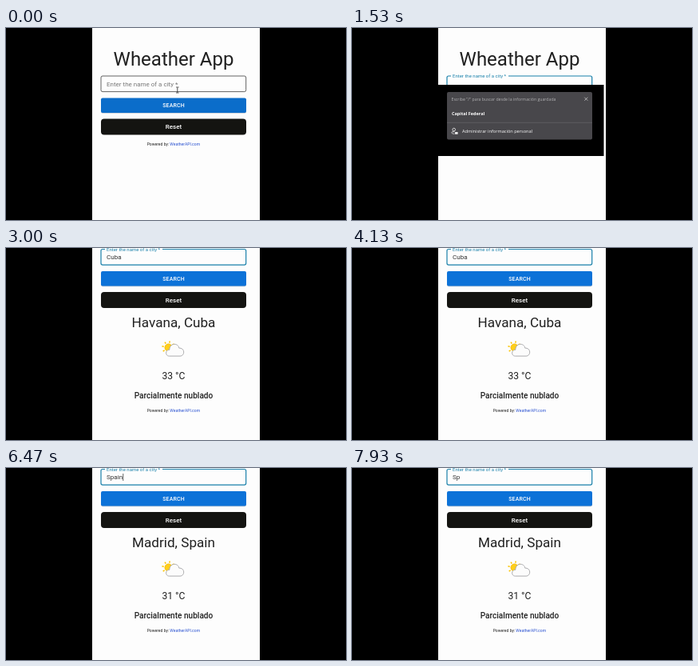
An HTML page with a canvas that plays this animation: 426x240 px, repeating every 8 s.

```html
<!DOCTYPE html>
<html lang="en">
<head>
<meta charset="utf-8">
<title>Weather search</title>
<style>
html, body { margin: 0; width: 100%; height: 100%; overflow: hidden; background: #000; }
canvas { display: block; width: 426px; height: 240px; }
</style>
</head>
<body>
<canvas id="stage"></canvas>
<script>
const W = 426, H = 240, LOOP = 8000, MID = 210;
const canvas = document.getElementById('stage');
const ctx = canvas.getContext('2d');
const ratio = window.devicePixelRatio || 1;
canvas.width = W * ratio;
canvas.height = H * ratio;

const ROBOTO = 'Roboto, sans-serif';
const OPEN = '"Open Sans", sans-serif';
const INK = '#202020', FOCUS = '#1980aa', PAGE = '#fdfdfd';

const FOCUS_AT = 1050, POPUP_AT = 1250, POPUP_END = 1870;
const RESULT_AT = 2500, SCROLL_AT = 2600, SECOND_AT = 6200;
const BLINK = 1060;

// Each entry: start, ms per key, word, deleting or not
const typing = [
  [1870, 110, 'Cuba', false],
  [4350, 90, 'Cuba', true],
  [5350, 130, 'Spain', false],
  [7700, 90, 'Spain', true]
];

const clamp = v => Math.max(0, Math.min(1, v));
const ease = v => { v = clamp(v); return v * v * (3 - 2 * v); };
const mix = (a, b, p) => a + (b - a) * p;

function text(str, x, y, size, color = INK, weight = 400, align = 'left', family = ROBOTO) {
  ctx.font = `${weight} ${size}px ${family}`;
  ctx.textAlign = align;
  ctx.fillStyle = color;
  ctx.fillText(str, x, y);
  return ctx.measureText(str).width;
}

function box(x, y, w, h, r, fill) {
  ctx.beginPath();
  ctx.roundRect(x, y, w, h, r);
  ctx.fillStyle = fill;
  ctx.fill();
}

function line(x1, y1, x2, y2, color, width = 1) {
  ctx.beginPath();
  ctx.moveTo(x1, y1);
  ctx.lineTo(x2, y2);
  ctx.strokeStyle = color;
  ctx.lineWidth = width;
  ctx.stroke();
}

function valueAt(t) {
  let value = '';
  for (const [start, step, word, erase] of typing) {
    if (t < start) break;
    const n = Math.min(word.length, Math.floor((t - start) / step) + 1);
    value = word.slice(0, erase ? word.length - n : n);
  }
  return value;
}

function field(t) {
  const focused = t >= FOCUS_AT;
  const p = ease((t - FOCUS_AT) / 200);
  ctx.beginPath();
  ctx.roundRect(119, 60, 181.7, 19.6, 2);
  ctx.strokeStyle = focused ? FOCUS : '#3c3c3c';
  ctx.lineWidth = focused ? 1.2 : 0.8;
  ctx.stroke();
  if (focused) {
    ctx.fillStyle = PAGE;
    ctx.fillRect(124, 59, 72 * p, 2);
  }
  text('Enter the name of a city *', 126, mix(72.8, 62, p), mix(8, 6, p), focused ? FOCUS : '#777');

  const w = text(valueAt(t), 126, 72.5, 8.1, '#333');
  if (focused && t % BLINK < 450) line(126.6 + w, 65.5, 126.6 + w, 74.5, INK, 0.7);
}

function button(label, y, h, fill, size, radius, spacing) {
  box(119, y, 182, h, radius, fill);
  ctx.letterSpacing = spacing;
  text(label, MID, y + h / 2 + size * 0.34, size, '#fff', 500, 'center');
  ctx.letterSpacing = '0px';
}

function poweredBy(y) {
  const w = text('Powered by: ', 176.7, y, 5.05);
  text('WeatherAPI.com', 176.7 + w, y, 5.05, '#2850d0');
}

function weatherIcon() {
  const x = 203.6, y = 183;
  for (let i = 0; i < 8; i++) {
    const a = i * Math.PI / 4 + 0.2, c = Math.cos(a), s = Math.sin(a);
    line(x + c * 6, y + s * 6, x + c * 8.3, y + s * 8.3, '#fcc400', 1.5);
  }
  ctx.beginPath();
  ctx.arc(x, y, 4.6, 0, 7);
  ctx.fillStyle = '#ffcf1a';
  ctx.strokeStyle = '#f5b800';
  ctx.lineWidth = 0.9;
  ctx.fill();
  ctx.stroke();

  ctx.beginPath();
  ctx.moveTo(204.5, 193.6);
  ctx.bezierCurveTo(199.3, 193.6, 199.3, 185.6, 204.8, 185.8);
  ctx.bezierCurveTo(204.8, 177, 215.8, 176.6, 216.8, 183.6);
  ctx.bezierCurveTo(224.4, 183, 224.4, 193.6, 218, 193.6);
  ctx.closePath();
  ctx.fillStyle = '#fcfcfc';
  ctx.strokeStyle = '#a4a4a8';
  ctx.fill();
  ctx.stroke();
}

function result(t) {
  const second = t >= SECOND_AT;
  text(second ? 'Madrid, Spain' : 'Havana, Cuba', MID, 157.8, 17.15, INK, 400, 'center');
  weatherIcon();
  text(second ? '31 °C' : '33 °C', MID, 222.6, 12.1, INK, 400, 'center');
  text('Parcialmente nublado', MID, 246, 10.08, INK, 500, 'center');
  poweredBy(263.8);
}

function popup() {
  ctx.fillStyle = '#000';
  ctx.fillRect(108, 71, 207.5, 89);
  box(119, 80, 182, 59.5, 2, '#48474b');
  text('Escribe "/" para buscar desde la información guardada', 124.5, 90.8, 5.18, '#b0b0b2', 400, 'left', OPEN);
  line(291.3, 86.7, 295.3, 90.7, '#ddd', 0.7);
  line(295.3, 86.7, 291.3, 90.7, '#ddd', 0.7);
  text('Capital Federal', 125, 108.6, 5.5, '#fff', 700, 'left', OPEN);
  line(119, 118.3, 301, 118.3, '#65656a', 0.7);

  ctx.strokeStyle = '#eee';
  ctx.lineWidth = 0.8;
  ctx.beginPath();
  ctx.arc(127.7, 127, 1.8, 0, 7);
  ctx.moveTo(128.5, 132.2);
  ctx.bezierCurveTo(124, 132.6, 124.5, 129.7, 126, 129.7);
  ctx.lineTo(128.5, 129.7);
  ctx.stroke();
  box(129, 130, 3.6, 2.8, 0.5, '#eee');
  text('Administrar información personal', 138, 131.3, 5.6, '#fff', 400, 'left', OPEN);
}

function pointer() {
  line(214.8, 74.3, 214.8, 80.8, '#222', 0.8);
  line(213, 74, 216.6, 74, '#222', 0.7);
  line(213, 81, 216.6, 81, '#222', 0.7);
}

function draw(t) {
  ctx.setTransform(ratio, 0, 0, ratio, 0, 0);
  ctx.fillStyle = '#000';
  ctx.fillRect(0, 0, W, H);
  ctx.save();
  ctx.beginPath();
  ctx.rect(108, 0, 210, H);
  ctx.clip();
  ctx.fillStyle = PAGE;
  ctx.fillRect(108, 0, 210, H);

  ctx.translate(0, -58.5 * ease((t - SCROLL_AT) / 200));
  text('Wheather App', MID, 46.8, 24, INK, 400, 'center');
  field(t);
  box(119, 88.5, 182, 18.3, 2, '#c4cad2');
  button('SEARCH', 87.5, 18.5, t < RESULT_AT ? '#0b6dca' : '#0c72d8', 7, 2, '0.15px');
  button('Reset', 113.6, 20, '#141411', 8, 4, '0px');
  if (t < RESULT_AT) poweredBy(147);
  else result(t);
  if (t < FOCUS_AT) pointer();
  if (t >= POPUP_AT && t < POPUP_END) popup();
  ctx.restore();
}

const began = performance.now();
function tick() {
  draw((performance.now() - began) % LOOP);
  requestAnimationFrame(tick);
}
tick();
</script>
</body>
</html>
```
